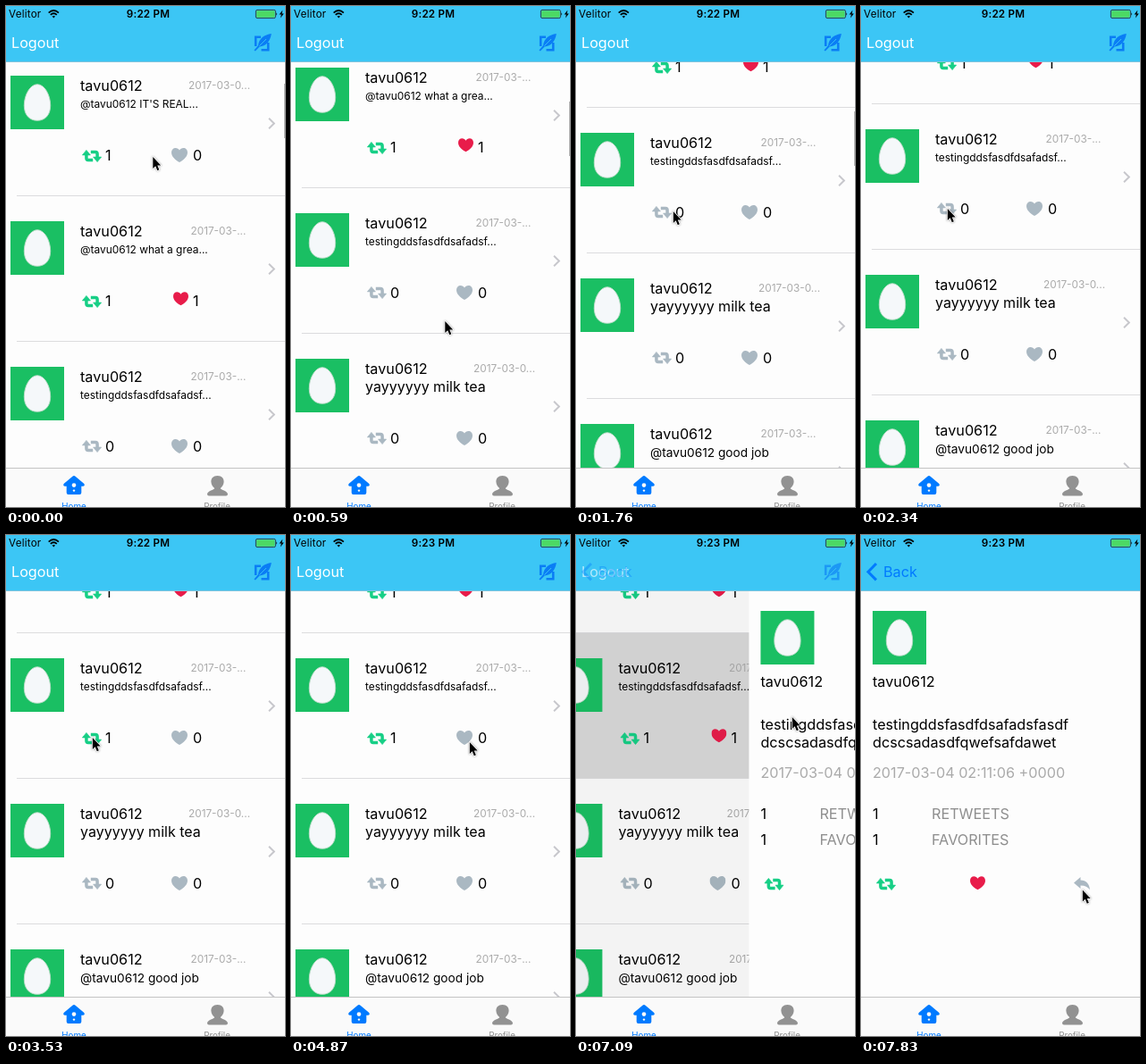
Write an HTML page that moves like this. It is 312 px wide and 561 px high and loops after 8000 ms.

```html
<!DOCTYPE html>
<html lang="en">
<head>
<meta charset="utf-8">
<title>Timeline</title>
<style>
  html, body { margin: 0; width: 100%; height: 100%; overflow: hidden; }
  body { position: relative; background: #fdfdfd; color: #000; font: 16.2px/20px Inter, Roboto, sans-serif; }
  div, span, svg { position: absolute; }
  span { white-space: pre; }
  svg { overflow: visible; }
  #stage { left: 0; top: 0; width: 312px; height: 561px; overflow: hidden; background: #fdfdfd; }
  #content { left: 0; top: 63px; width: 312px; height: 454px; overflow: hidden; }
  #list, #rows, #detail, #dim { left: 0; top: 0; width: 312px; height: 454px; }
  #detail { background: #fdfdfd; }
  #dim { background: #000; }
  .row { left: 0; width: 312px; height: 163px; }
  .row.lit { background: #d9d9d9; }
  .row::after { content: ""; position: absolute; left: 12px; right: 0; bottom: 0; height: 1px; background: #dcdcde; }
  .avatar { width: 60px; height: 60px; background: #1abf63; }
  .date { color: #aaa; }
  .label { color: #8e8e8e; }
  .off { color: #aab8c2; }
  .rt { color: #17cf86; }
  .fav { color: #e81c4a; }
  #thumb { left: 311px; width: 2px; height: 61px; background: #b0b0b0; }
  #nav { left: 0; top: 0; width: 312px; height: 63px; background: #3cc6f5; box-shadow: inset 0 -1px #7fc4dc; }
  #nav .status { font-size: 11.7px; letter-spacing: .2px; }
  #clock { left: 109.5px; width: 99px; text-align: center; font-weight: 600; }
  #tabs { left: 0; top: 517px; width: 312px; height: 44px; background: #fafafa; border-top: 1px solid #c4c4c4; box-sizing: border-box; }
  #tabs span { width: 80px; text-align: center; font-size: 9.8px; }
  .blue { color: #007aff; }
  .gray { color: #929292; }
</style>
</head>
<body>
<svg width="0" height="0">
  <symbol id="retweet" viewBox="0 0 22 14">
    <path d="M4.9 4V9.2Q4.9 11.5 7 11.5H12.2M9.8 2.5H15Q17.1 2.5 17.1 4.8V10" fill="none" stroke="currentColor" stroke-width="3.5"/>
    <path d="M4.9 .4 9.4 5.9H.4ZM17.1 13.6 21.6 8.1H12.6Z" fill="currentColor" stroke="currentColor" stroke-width=".7" stroke-linejoin="round"/>
  </symbol>
  <symbol id="heart" viewBox="0 0 18 16">
    <path d="M9 16C4 13.2 0 9.4 0 5 0 2 2 0 4.6 0 6.5 0 8.1 1 9 2.6 9.9 1 11.5 0 13.4 0 16 0 18 2 18 5c0 4.4-4 8.2-9 11Z" fill="currentColor"/>
  </symbol>
  <symbol id="reply" viewBox="0 0 18 15">
    <path d="M0 6.5 7.5 0V3.6C14 3.8 17.6 8 18 14.5 15.6 10.8 12.4 9.3 7.5 9.4V13Z" fill="currentColor"/>
  </symbol>
  <symbol id="more" viewBox="0 0 8 13">
    <path d="M1 .8 6.8 6.5 1 12.2" fill="none" stroke="#c7c7cc" stroke-width="1.9"/>
  </symbol>
  <symbol id="egg" viewBox="0 0 60 60">
    <path d="M30 9.7C38 9.7 44.7 21.5 44.7 33.5 44.7 44.2 38.5 50.3 30 50.3S15.3 44.2 15.3 33.5C15.3 21.5 22 9.7 30 9.7Z" fill="#f5f8fa" stroke="#b9dcc6" stroke-width=".9"/>
  </symbol>
</svg>

<div id="stage">
  <div id="content">
    <div id="list">
      <div id="rows"></div>
      <div id="thumb"></div>
      <div id="dim"></div>
    </div>
    <div id="detail"></div>
  </div>

  <div id="nav">
    <span class="status" style="left:3px;top:-1px">Velitor</span>
    <svg style="left:47px;top:4px" width="13" height="10" fill="none" stroke="#000" stroke-width="1.8">
      <path d="M.7 3.6Q6.3-1.6 11.9 3.6M2.8 5.9Q6.3 2.7 9.8 5.9"/>
      <path d="M6.3 9.6 4.5 7.6Q6.3 6.2 8.1 7.6Z" fill="#000" stroke="none"/>
    </svg>
    <span class="status" id="clock" style="top:-1px"></span>
    <svg style="left:279px;top:4px" width="33" height="11">
      <rect x=".4" y=".4" width="22" height="9.2" rx="1.6" fill="none" stroke="#222" stroke-width=".8"/>
      <rect x="1.2" y="1.2" width="20.4" height="7.6" rx=".8" fill="#4cd964"/>
      <path d="M23.4 3.2Q25 5 23.4 6.8Z"/>
      <path d="M30.4 .6 26.6 5.5H28.9L27.8 9.6 31.8 4.4H29.5Z"/>
    </svg>
    <div id="listNav">
      <span style="left:6px;top:31px;color:#fff">Logout</span>
      <svg style="left:277px;top:31px" width="20" height="20">
        <path d="M8 3.7H2.2V14M8.5 18.2H16.2V10" fill="none" stroke="#0a7df5" stroke-width="2.6"/>
        <path d="M19.8 0C12 1 5.8 5.5 5 13.2L.4 18.4 1.8 19.6 6.6 14.6C13.6 13.8 18.6 8.6 19.8 0Z" fill="#0a7df5"/>
        <path d="M6.4 13.6 14 6" stroke="#3cc6f5" stroke-width=".9"/>
      </svg>
    </div>
    <div id="backNav" class="blue">
      <svg style="left:6px;top:31px" width="12" height="20">
        <path d="M11 1 2 10.2 11 19.4" fill="none" stroke="currentColor" stroke-width="3"/>
      </svg>
      <span style="left:25px;top:31px">Back</span>
    </div>
  </div>

  <div id="tabs">
    <svg class="blue" style="left:64px;top:8px" width="24" height="22" fill="currentColor">
      <path d="M12 0Q12.8 0 13.6 .7L23.4 9Q24.6 11.6 22 11.8H20.3V19Q20.3 21 18.3 21H5.7Q3.7 21 3.7 19V11.8H2Q-.6 11.6 .6 9L10.4 .7Q11.2 0 12 0Z"/>
      <circle cx="12" cy="10.6" r="2.3" fill="#fafafa"/>
      <circle cx="12" cy="16.6" r="1.2" fill="#fafafa"/>
    </svg>
    <span class="blue" style="left:36px;top:32.5px">Home</span>
    <svg class="gray" style="left:225px;top:8px" width="23" height="23" fill="currentColor">
      <path d="M11.5 0C16.4 0 18.8 3 18.6 7 18.4 10.3 16.4 12.6 14.8 14 15 16 22.6 16.8 23 20.5Q23 22.4 21 22.4H2Q0 22.4 0 20.5C.4 16.8 8 16 8.2 14 6.6 12.6 4.6 10.3 4.4 7 4.2 3 6.6 0 11.5 0Z"/>
    </svg>
    <span class="gray" style="left:196px;top:32.5px">Profile</span>
  </div>

  <svg id="cursor" style="left:0;top:0" width="12" height="18">
    <path d="M.8 1V14L3.7 11.3 5.8 16.2 7.8 15.3 5.8 10.5H9.7Z" stroke="#fff" stroke-width="1.6" paint-order="stroke" stroke-linejoin="round" style="filter:drop-shadow(0 .8px .8px #0006)"/>
  </svg>
</div>

<script>
const $ = id => document.getElementById(id);
const USER = 'tavu0612';
const LOOP = 8000, WIDTH = 312, PITCH = 163, END = 266;
const SMALL = 11.95;

// Text is placed by its vertical centre, icons by their centre point.
const text = (x, cy, str, cls = '', size = 16.2) =>
  `<span class="${cls}" style="left:${x}px;top:${cy - 10}px;font-size:${size}px">${str}</span>`;
const icon = (id, cx, cy, w, h, cls = '') =>
  `<svg class="${cls}" style="left:${cx - w / 2}px;top:${cy - h / 2}px" width="${w}" height="${h}"><use href="#${id}"/></svg>`;
const avatar = (x, y) =>
  `<div class="avatar" style="left:${x}px;top:${y}px">${icon('egg', 30, 30, 60, 60)}</div>`;
const retweet = (x, y, on) => icon('retweet', x, y, 22, 14, on ? 'rt' : 'off');
const heart = (x, y, on) => on
  ? icon('heart', x, y, 17, 15.5, 'fav')
  : icon('heart', x, y, 18, 16, 'off');

const actions = (rt, fav) =>
  retweet(96, rt ? 117.7 : 116.7, rt) + text(111, 117, rt) +
  heart(fav ? 195 : 194, fav ? 114.5 : 116.7, fav) + text(209, 117, fav);

const posts = [
  { body: `@${USER} IT'S REAL...`, size: SMALL, wide: true, rt: 1, fav: 0 },
  { body: `@${USER} what a grea...`, size: SMALL, rt: 1, fav: 1 },
  { body: 'testingddsfasdfdsafadsf...', size: SMALL, rt: 0, fav: 0 },
  { body: 'yayyyyyy milk tea', size: 16, wide: true, rt: 0, fav: 0 },
  { body: `@${USER} good job`, size: 13.7, rt: 0, fav: 0 }
];

$('rows').innerHTML = posts.map((p, i) =>
  `<div class="row" style="top:${i * PITCH - 13}px">` +
  avatar(5, 28.4) + text(83, 39.2, USER) +
  text(p.wide ? 204 : 206.5, 39.2, p.wide ? '2017-03-0...' : '2017-03-...', 'date', 11.8) +
  text(83, p.size > 15 ? 58.7 : 60.2, p.body, '', p.size) +
  icon('more', 297.3, 81, 8, 13) +
  `<div class="actions">${actions(p.rt, p.fav)}</div></div>`).join('');

$('detail').innerHTML = avatar(13, 22) +
  text(13, 101, USER) +
  text(13, 149, 'testingddsfasdfdsafadsfasdf') +
  text(13, 169, 'dcscsadasdfqwefsafdawet') +
  text(13, 203, '2017-03-04 02:11:06 +0000', 'date') +
  text(13, 249, '1') + text(79, 249, 'RETWEETS', 'label') +
  text(13, 278, '1') + text(79, 278, 'FAVORITES', 'label') +
  retweet(28, 327.5, true) + heart(130, 327, true) +
  icon('reply', 247, 327, 18, 15, 'off');

const tapped = document.querySelectorAll('.row')[2];
const tappedActions = tapped.querySelector('.actions');

// Keys are [tick, values...].
const pointer = [
  [0, 163.5, 168], [4, 171.5, 352], [8, 181.5, 273.5], [12, 108, 229], [16, 96, 226],
  [27, 96, 226], [33, 199, 231], [41, 199, 231], [46, 241, 203], [48, 241, 203], [53, 247, 396.5]
];
const remaining = [[0, 266], [4, 94], [8, 26], [12, 4], [16, 0]];
const push = [[47, 0], [48, .38], [49, .88], [50, 1]];

function at(keys, k, col = 1, map = v => v, unmap = v => v) {
  let i = 1;
  while (i < keys.length - 1 && keys[i][0] < k) i++;
  const a = keys[i - 1], b = keys[i];
  const u = Math.min(1, Math.max(0, (k - a[0]) / (b[0] - a[0])));
  return unmap(map(a[col]) * (1 - u) + map(b[col]) * u);
}

// The screen refreshes in coarse ticks of about 147 ms.
const tick = t => t < 2340
  ? Math.floor((t + 1) / 146.25)
  : Math.min(53, 16 + Math.floor((t - 2340) / 148.3));

let last = -1;
function draw(k) {
  // Scrolling decays exponentially.
  const scroll = Math.round(END - at(remaining, k, 1, v => Math.log(v + 2), v => Math.exp(v) - 2));
  const p = at(push, k);
  $('rows').style.transform = `translateY(${-scroll}px)`;
  $('thumb').style.top = 24 + scroll * .118 + 'px';
  $('thumb').style.opacity = k < 15 ? 1 : k < 16 ? .5 : 0;
  $('list').style.transform = `translateX(${-p * WIDTH * .3}px)`;
  $('dim').style.opacity = p * .1;
  $('detail').style.transform = `translateX(${(1 - p) * WIDTH}px)`;
  $('listNav').style.opacity = 1 - p;
  $('backNav').style.opacity = p;
  $('clock').textContent = k < 30 ? '9:22 PM' : '9:23 PM';
  tapped.classList.toggle('lit', k >= 47);
  tappedActions.innerHTML = actions(+(k >= 24), +(k >= 41));
  $('cursor').style.transform = `translate(${at(pointer, k)}px, ${at(pointer, k, 2)}px)`;
}

const start = performance.now();
function frame() {
  const k = tick((performance.now() - start) % LOOP);
  if (k !== last) draw(last = k);
  requestAnimationFrame(frame);
}
frame();
</script>
</body>
</html>
```
